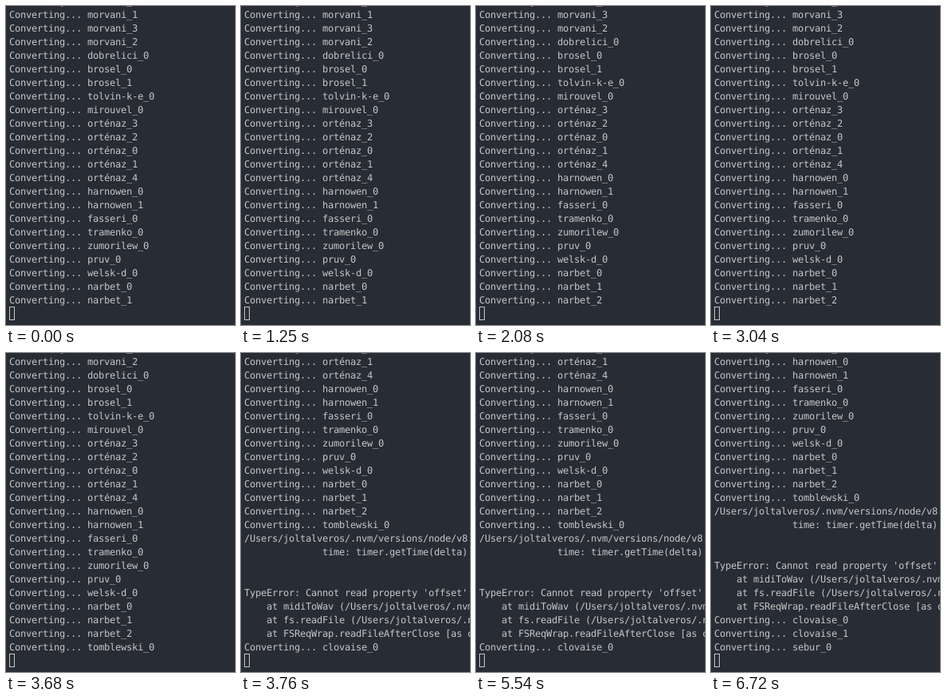
These frames come from a looping animation (287 px wide and 399 px high, 6880 ms). An HTML page with a canvas:

```html
<!DOCTYPE html>
<html lang="en">
<head>
<meta charset="utf-8">
<title>Converter log</title>
<style>
  html, body { margin: 0; height: 100%; overflow: hidden; background: #282c34; }
  canvas { display: block; }
</style>
</head>
<body>
<canvas id="terminal" width="287" height="399"></canvas>
<script>
const LOOP = 6880, ROWS = 23, LINE = 17, CELL = 7, LEFT = 4;
const BASELINE = -2; // the top row is scrolled out except for its descenders
const BACKGROUND = '#282c34', FOREGROUND = '#c7c7c7';

const converting = names => names.split(' ').map(name => 'Converting... ' + name);
const home = '/Users/joltalveros/.nvm/versions/node/v8.9';

const log = [
  ...converting('morvani_0 morvani_1 morvani_3 morvani_2 dobrelici_0 brosel_0 brosel_1 tolvin-k-e_0'),
  ...converting('mirouvel_0 orténaz_3 orténaz_2 orténaz_0 orténaz_1 orténaz_4 harnowen_0 harnowen_1'),
  ...converting('fasseri_0 tramenko_0 zumorilew_0 pruv_0 welsk-d_0 narbet_0 narbet_1 narbet_2 tomblewski_0'),
  home,
  ' '.repeat(14) + 'time: timer.getTime(delta)',
  '',
  '',
  "TypeError: Cannot read property 'offset' of undefined",
  `    at midiToWav (${home}`,
  `    at fs.readFile (${home}`,
  '    at FSReqWrap.readFileAfterClose [as oncomplete]',
  ...converting('clovaise_0 clovaise_1 sebur_0'),
];

// [start time in ms, log line in the top row]
const scrolls = [[0, 0], [2080, 1], [3680, 2], [3760, 11], [6720, 13]];

const ctx = document.getElementById('terminal').getContext('2d', { alpha: false });
ctx.font = '12px "DejaVu Sans Mono", monospace';
ctx.textRendering = 'geometricPrecision';
// Snap glyphs to the terminal's whole-pixel cell grid
ctx.letterSpacing = CELL - ctx.measureText('0').width + 'px';

function draw(first) {
  ctx.fillStyle = BACKGROUND;
  ctx.fillRect(0, 0, 287, 399);
  ctx.fillStyle = ctx.strokeStyle = FOREGROUND;
  log.slice(first, first + ROWS).forEach((line, row) =>
    ctx.fillText(line, LEFT, BASELINE + row * LINE));
  ctx.strokeRect(LEFT + 0.5, 376.5, CELL - 1, LINE - 1);
}

const start = performance.now();
function tick() {
  const time = (performance.now() - start) % LOOP;
  draw(scrolls.findLast(([from]) => time >= from)[1]);
  requestAnimationFrame(tick);
}
tick();
</script>
</body>
</html>
```
